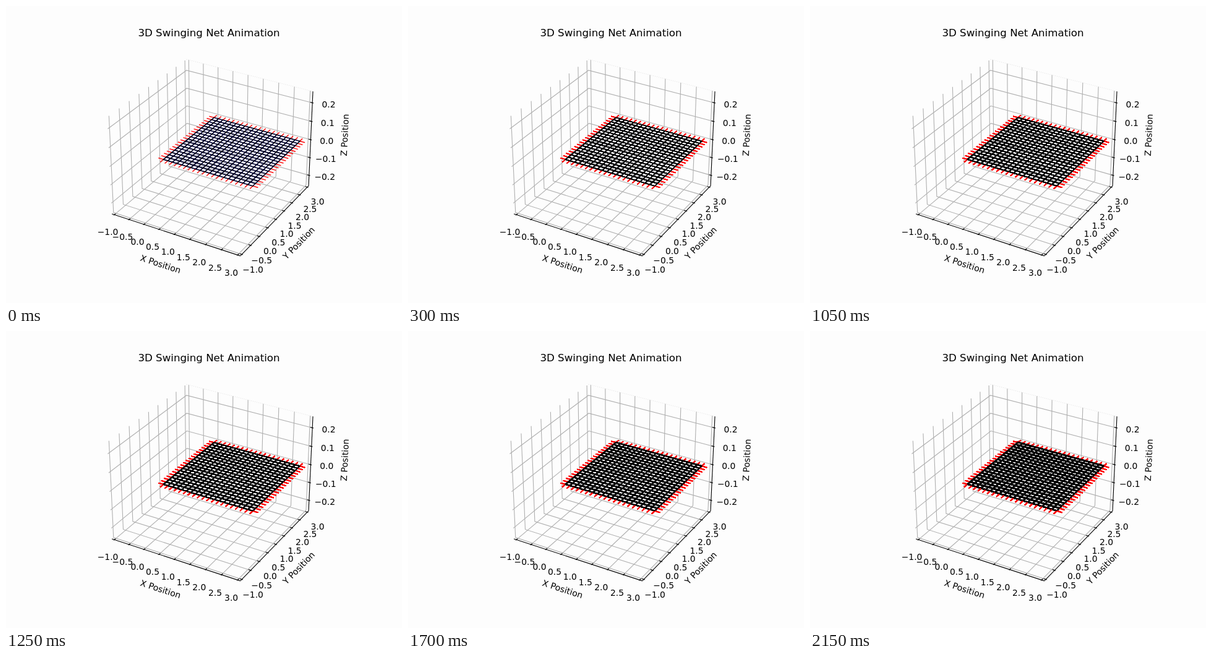
Write an HTML page with a canvas that moves like this. It is 640 px wide and 480 px high and loops after 2200 ms.

```html
<!DOCTYPE html>
<html lang="en">
<head>
<meta charset="utf-8">
<title>3D Swinging Net Animation</title>
<style>
  html, body { margin: 0; width: 100%; height: 100%; overflow: hidden; background: #fdfdfd; }
  svg, canvas { position: absolute; left: 0; top: 0; width: 640px; height: 480px; }
  text { font: 13.89px "DejaVu Sans", Verdana, sans-serif; text-anchor: middle; }
  .title { font-size: 16.67px; }
  path { fill: none; stroke-width: 1.11; }
  .grid { stroke: #b0b0b0; }
  .axis { stroke: #000; }
  .edge { stroke: #e2e2e2; stroke-width: 1; stroke-dasharray: 1 2; }
</style>
</head>
<body>
<svg id="plot" viewBox="0 0 640 480"></svg>
<canvas id="net" width="640" height="480"></canvas>
<script>
const STEP_MS = 50, STEPS = 44;
const EDGE = 25 / 48;            // half size of the padded unit box
const LABEL = EDGE + 0.0864;     // tick label distance
const NAME = EDGE + 0.1879;      // axis name distance

// Perspective view of a unit box centred on 0: elevation 30, azimuth -60.
function project(x, y, z) {
  const a = x * 8 / 7, b = y * 8 / 7, c = z * 6 / 7;
  const h = Math.sqrt(3) / 2;
  const depth = 10 - (h / 2 * a - 0.75 * b + 0.5 * c);
  const scale = 369.6 / 0.185 / depth;
  return [333 + (h * a + 0.5 * b) * scale,
          237.4 - (-0.25 * a + h / 2 * b + h * c) * scale];
}

const plot = document.getElementById("plot");

function add(tag, attrs, text = "") {
  const el = document.createElementNS("http://www.w3.org/2000/svg", tag);
  for (const key in attrs) el.setAttribute(key, attrs[key]);
  el.textContent = text;
  plot.append(el);
}

function line(cls, ...points) {
  const d = "M" + points.map(p => project(...p).map(v => v.toFixed(2)).join(" ")).join("L");
  add("path", { class: cls, d });
}

function tickText(value, point) {
  const [x, y] = project(...point);
  add("text", { x, y: y + 10.7 }, value.toFixed(1).replace("-", "\u2212"));
}

function axisName(name, point, from, to) {
  const [x, y] = project(...point), [x0, y0] = project(...from), [x1, y1] = project(...to);
  const angle = Math.atan2(y1 - y0, x1 - x0) * 180 / Math.PI;
  add("text", { transform: `translate(${x} ${y}) rotate(${angle})`, y: 3.9 }, name);
}

function drawPlot() {
  const E = EDGE, out = E + 0.1 / 12, inn = E - 0.2 / 12;
  const flat = [...Array(9).keys()].map(i => -1 + i / 2);
  const high = [-2, -1, 0, 1, 2].map(i => i / 10);
  const unit = v => (v - 1) / 4;

  line("edge", [-E, E, E], [E, E, E]);
  for (const v of flat) line("grid", [unit(v), -E, -E], [unit(v), E, -E], [unit(v), E, E]);
  for (const v of flat) line("grid", [E, unit(v), -E], [-E, unit(v), -E], [-E, unit(v), E]);
  for (const v of high) line("grid", [-E, -E, v * 2], [-E, E, v * 2], [E, E, v * 2]);

  const left = [-E, -E, -E], front = [E, -E, -E], right = [E, E, -E], top = [E, E, E];
  line("axis", left, front);
  line("axis", front, right);
  line("axis", right, top);

  for (const v of flat) {
    const n = unit(v);
    line("axis", [n, -out, -E], [n, -inn, -E]);
    line("axis", [out, n, -E], [inn, n, -E]);
    tickText(v, [n, -LABEL, -LABEL]);
    tickText(v, [LABEL, n, -LABEL]);
  }
  for (const v of high) {
    line("axis", [out, E, v * 2], [inn, E, v * 2]);
    tickText(v, [LABEL, LABEL, v * 2]);
  }
  axisName("X Position", [0, -NAME, -NAME], left, front);
  axisName("Y Position", [NAME, 0, -NAME], front, right);
  axisName("Z Position", [NAME, NAME, 0], right, top);
  add("text", { class: "title", x: 328, y: 49.3 }, "3D Swinging Net Animation");
}

const NODES = 20, GAP = 0.15, LAST = (NODES - 1) * GAP;
const ctx = document.getElementById("net").getContext("2d");
ctx.lineWidth = 1.39;
ctx.lineCap = "square";

const spot = (x, y, lift) => {
  const [px, py] = project((x - 1) / 4, (y - 1) / 4, 0);
  return [px, py - lift];
};

function stroke(color, from, to) {
  ctx.strokeStyle = color;
  ctx.beginPath();
  ctx.moveTo(...from);
  ctx.lineTo(...to);
  ctx.stroke();
}

function drawMesh(color, lift) {
  for (let i = 0; i < NODES; i++) {
    const p = i * GAP;
    stroke(color, spot(0, p, lift), spot(LAST, p, lift));
    stroke(color, spot(p, 0, lift), spot(p, LAST, lift));
  }
}

function drawAnchors(lift) {
  for (let i = 0; i < NODES; i++) {
    const p = i * GAP;
    for (const [end, tip] of [[0, -GAP], [LAST, LAST + GAP]]) {
      stroke("#f00", spot(tip, p, 0), spot(end, p, lift));
      stroke("#f00", spot(p, tip, 0), spot(p, end, lift));
    }
  }
}

// Every step leaves one more layer on top of the earlier ones.
let drawn = -1;
function tick() {
  const step = Math.floor(performance.now() / STEP_MS) % STEPS;
  if (step < drawn) {
    ctx.clearRect(0, 0, 640, 480);
    drawn = -1;
  }
  if (drawn < 0) drawMesh("#00f", 0);
  while (drawn < step) {
    drawn++;
    const lift = (drawn / (STEPS - 1)) ** 2;
    drawAnchors(lift);
    drawMesh("#000", lift);
  }
  requestAnimationFrame(tick);
}

drawPlot();
tick();
</script>
</body>
</html>
```
